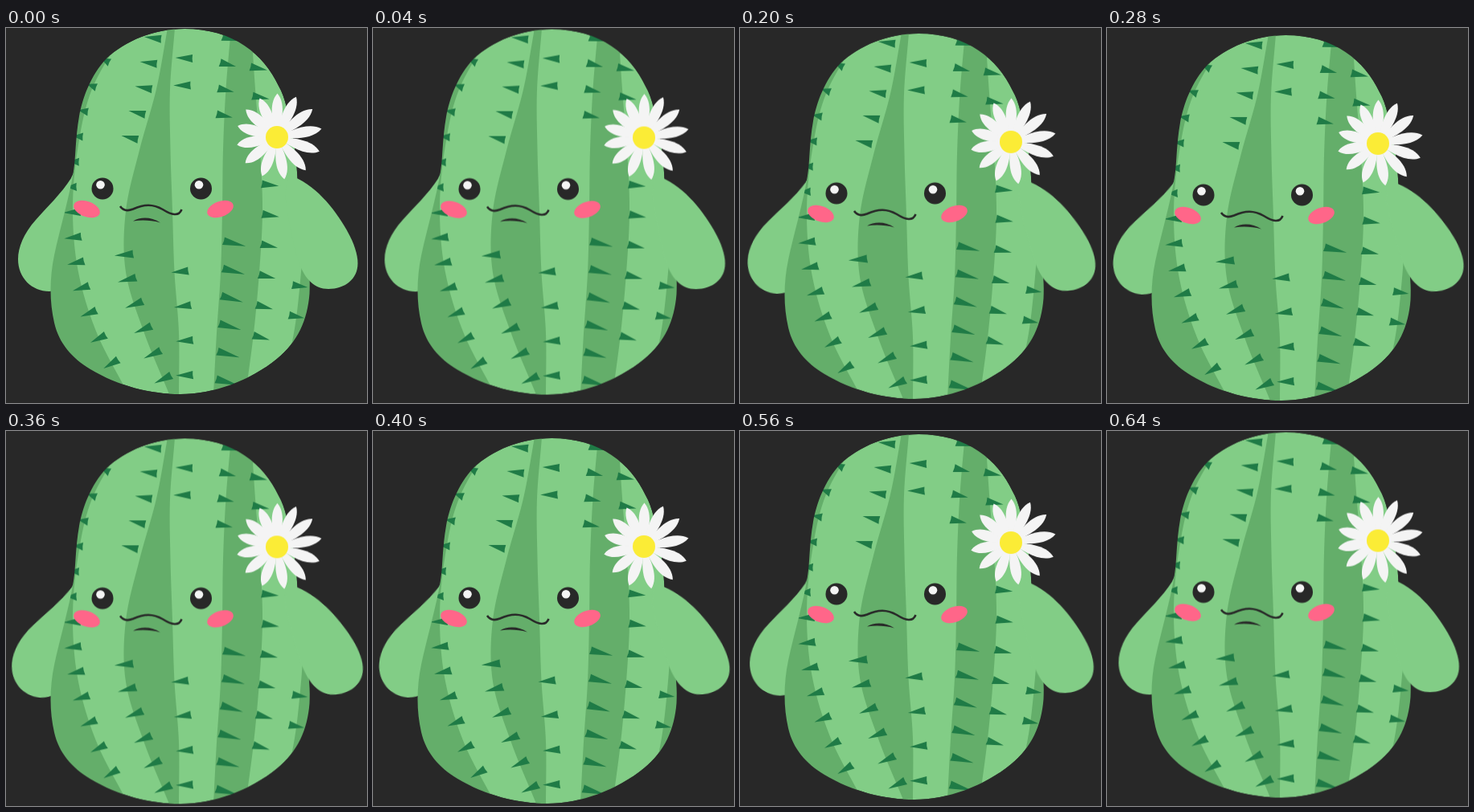
Recreate the animation shown at these times as an HTML page. Size 449 px wide and 467 px high, loop 680 ms.

```html
<!DOCTYPE html>
<html lang="en">
<head>
<meta charset="utf-8">
<title>Cactus</title>
<style>
  html, body { margin: 0; width: 100%; height: 100%; overflow: hidden; background: #282828; }
  svg { display: block; width: 100vw; height: 100vh; }
  .light { fill: #82cd86; }
  #stripes { fill: #64ae6a; }
  #spines { fill: #1f7b46; }
  #petals { fill: #f4f4f4; }
  .ink { fill: #282828; }
  .blush { fill: #ff6689; }
  #armL { transform-origin: 95px 200px; }
  #armR { transform-origin: 340px 210px; }
</style>
</head>
<body>
<svg viewBox="0 0 449 467">
  <defs>
    <clipPath id="shape">
      <path id="outline" d="M222 1 C184 1 148 16 125 38 C105 59 95 88 91 110 C86 138 87 160 84 178 C79 210 67 250 60 283 C54 312 54 341 60 367 C66 393 82 411 105 425 C140 446 180 456 217 456 C258 456 304 439 337 412 C363 391 375 363 377.500 331 C380 300 370 255 366 228 C362 200 363 165 357 137 C351 108 348 87 339 72 C321 33 283 1 222 1 Z"/>
    </clipPath>
  </defs>
  <g id="cactus">
    <path id="armL" class="light" d="M100 160 C86 175 84 181 81 187 C69 206 51 223 37 239 C22 256 15 273 15 288 C15 311 32 328 54 328 C82 326 100 295 110 250 Z"/>
    <g clip-path="url(#shape)">
      <use href="#outline" class="light"/>
      <g id="stripes"></g>
      <g id="spines"></g>
    </g>
    <path id="armR" class="light" d="M352 183 C384 194 408 224 424 252 C433 268 437.500 282 437.500 293 C437.500 313 421 325 401 325 C383 325 372 312 365 294 C358 276 350 235 347 205 Z"/>
    <g id="face">
      <ellipse class="blush" rx="17" ry="9.6" transform="translate(100.5 225.5) rotate(20)"/>
      <ellipse class="blush" rx="17" ry="9.6" transform="translate(266.5 225.5) rotate(-20)"/>
      <path d="M142 222 C146 228 152 228 158 225.500 C172 219 183 219 195 226 C206 233 215 235 218.500 226" fill="none" stroke="#282828" stroke-width="2.6"/>
      <path class="ink" d="M158 240.500 C167 235 181 235 192 242.500 C180 239 168 239 158 240.500 Z"/>
    </g>
    <g id="petals"></g>
    <circle cx="337" cy="136" r="14" fill="#fbec36"/>
  </g>
</svg>
<script>
const $ = id => document.getElementById(id);

function add(parent, tag, attrs) {
  const el = document.createElementNS('http://www.w3.org/2000/svg', tag);
  for (const k in attrs) el.setAttribute(k, attrs[k]);
  $(parent).append(el);
}

// Stripe edges: x at evenly spaced heights, joined by a smooth spline
const GAP = 76;
const edge = (...xs) => y => {
  const i = Math.min(Math.floor(y / GAP), xs.length - 2), t = y / GAP - i;
  const b = xs[i], c = xs[i + 1], a = xs[i - 1] ?? 2 * b - c, d = xs[i + 2] ?? 2 * c - b;
  return b + t / 2 * (c - a + t * (2 * a - 5 * b + 4 * c - d + t * (3 * (b - c) + d - a)));
};

const rimL = edge(150, 107, 89, 83, 90, 113, 152);
const midL = edge(201, 187, 166, 149, 149, 172, 203);
const midR = edge(210, 204, 204.5, 207, 209.5, 215, 215);
const sideL = edge(280, 273.5, 270, 269, 267, 262, 258);
const sideR = edge(305, 310, 316, 319, 315, 308, 298);
const rimR = edge(400, 390, 380, 372, 367, 358, 340);

function stripe(left, right) {
  const l = [], r = [];
  for (let y = 0; y <= 6 * GAP; y += 6) {
    l.push([left(y), y]);
    r.unshift([right(y), y]);
  }
  add('stripes', 'path', { d: `M${l.concat(r).join(' ')}Z` });
}

stripe(() => 0, rimL);
stripe(midL, midR);
stripe(sideL, sideR);
stripe(rimR, () => 449);

// A run of spines along an edge, square to it; side is -1 for left, 1 for right
function spines(line, side, { from, step, count, dx = 0, len = 22, tilt = 0 }) {
  for (let i = 0; i < count; i++) {
    const y = from + i * step, h = len / 2;
    const slope = (line(y + 4) - line(y - 4)) / 8;
    const angle = tilt - Math.atan(slope) * 180 / Math.PI;
    add('spines', 'path', {
      d: `M${h} 1 L${1 - h} -5 Q${1.5 - h} 0 ${-h} 5 Z`,
      transform: `translate(${line(y) + dx} ${y}) rotate(${angle}) scale(${side} 1)`
    });
  }
}

spines(rimL, -1, { from: 40, step: 31.5, count: 6, dx: -2, len: 13 });
spines(rimL, -1, { from: 229, step: 31.5, count: 7, dx: -1 });
spines(midL, -1, { from: 12, step: 31, count: 5, dx: -16 });
spines(midL, -1, { from: 282, step: 31, count: 6, len: 24 });
spines(midR, -1, { from: 37, step: 34, count: 2, dx: 15 });
spines(midR, -1, { from: 303, step: 43, count: 4, dx: 7 });
spines(sideL, 1, { from: 13, step: 32, count: 4, len: 21, tilt: 6 });
spines(sideL, 1, { from: 268, step: 34.5, count: 6, dx: 16, len: 29, tilt: 10 });
spines(sideR, 1, { from: 50, step: 36, count: 2, dx: 6, tilt: 12 });
spines(sideR, 1, { from: 195, step: 38, count: 6, dx: 10, tilt: 6 });
spines(rimR, 1, { from: 321, step: 38, count: 2, len: 20 });

for (const x of [120, 242.5]) {
  add('face', 'circle', { cx: x, cy: 200, r: 13.5, fill: '#282828' });
  add('face', 'circle', { cx: x - 2.5, cy: 195.2, r: 5.3, fill: '#f4f4f4' });
}

// Petals fan out a little unevenly
const PETALS = 13;
for (let i = 0; i < PETALS; i++) {
  const sway = Math.cos((i - 2.5) / PETALS * 2 * Math.PI);
  const len = 53.5 + 3 * sway, angle = 360 / PETALS * i - 87 - 7 * sway;
  add('petals', 'path', {
    d: `M0 0 C${.3 * len} -5 ${.75 * len} -12 ${len} 0 C${.75 * len} 12 ${.3 * len} 5 0 0 Z`,
    transform: `translate(337 136) rotate(${angle})`
  });
}

// One bob per loop, held for 40 ms at a time
const LOOP = 680, STEPS = 17;
const bob = t => Math.abs(Math.sin(Math.PI * t)) ** 1.6;

function play(id, pose) {
  const frames = Array.from({ length: STEPS + 1 }, (_, i) => ({
    transform: pose(bob(i / STEPS)), easing: 'steps(1, end)'
  }));
  $(id).animate(frames, { duration: LOOP, iterations: Infinity });
}

play('cactus', v => `translateY(${8.4 * v}px)`);
play('armL', v => `rotate(${5.2 * v}deg)`);
play('armR', v => `rotate(${-4.6 * v}deg)`);
</script>
</body>
</html>
```
